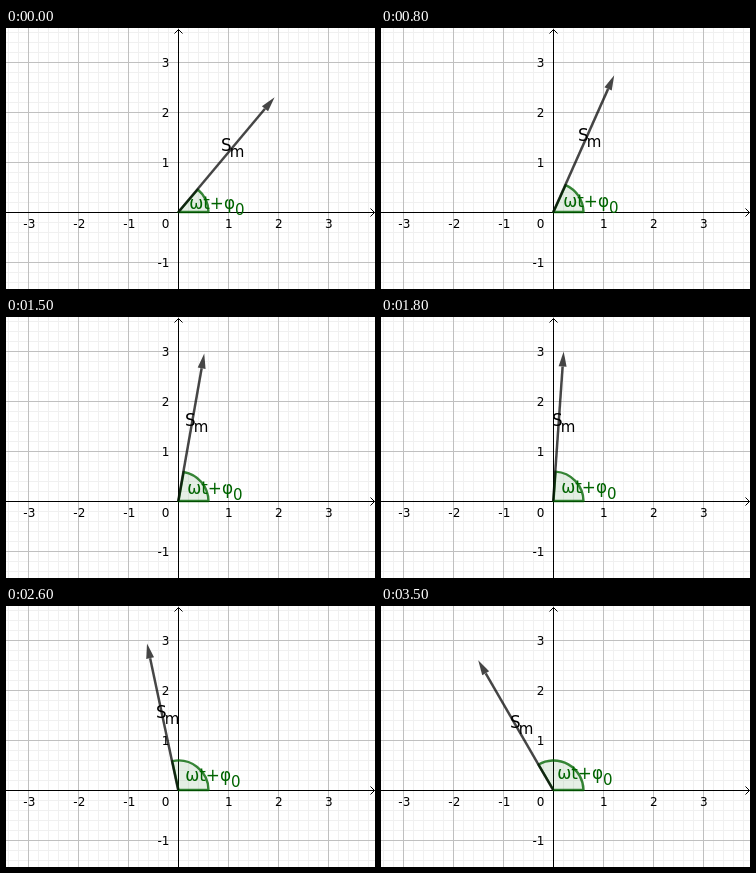
Write an HTML page that moves like this. It is 369x261 px and loops after 3600 ms.

```html
<!DOCTYPE html>
<html lang="en">
<head>
<meta charset="utf-8">
<title>Rotating vector</title>
<style>
  html, body { margin: 0; width: 100%; height: 100%; overflow: hidden; background: #fff; }
  svg { display: block; width: 369px; height: 261px; }
  text { font-family: "DejaVu Sans", sans-serif; }
  path { fill: none; }
  #minor { stroke: #f0f0f0; }
  #major { stroke: #c0c0c0; }
  #axes { stroke: #000; }
  #ticks { font-size: 12px; }
  #sector { fill: rgba(0, 100, 0, .1); stroke: rgba(0, 100, 0, .78); stroke-width: 2.4; stroke-linejoin: round; }
  #vector { opacity: .72; }
  #shaft { stroke: #000; stroke-width: 2.5; }
  #head { fill: #000; }
  .label { font-size: 16.8px; }
  .sub { font-size: 15px; }
  #phase { fill: #006400; }
</style>
</head>
<body>
<svg viewBox="0 0 369 261">
  <path id="minor"/>
  <path id="major"/>
  <path id="axes" d="M0 184.5H368.5M172.5 261V1.5M364.5 180.5l4 4l-4 4M168.5 5.5l4 -4l4 4"/>
  <g id="ticks"></g>
  <path id="sector"/>
  <g id="vector">
    <path id="shaft" d="M0 0H135"/>
    <path id="head" d="M150 0l-15 -4v8z"/>
  </g>
  <g id="phase" class="label">
    <text x="-.8">ωt+φ</text><text class="sub" x="45" y="6">0</text>
  </g>
  <g id="amplitude" class="label">
    <text x="-1">S</text><text class="sub" x="7.8" y="6">m</text>
  </g>
</svg>
<script>
  const W = 369, H = 261, UNIT = 50, OX = 172.5, OY = 184.5;
  const LENGTH = 3 * UNIT, RADIUS = 30, STEP_MS = 100, STEPS = 36;
  const get = id => document.getElementById(id);

  function gridPath(gap) {
    let d = '';
    for (let x = OX % gap; x < W; x += gap) d += `M${x} 0V${H}`;
    for (let y = OY % gap; y < H; y += gap) d += `M0 ${y}H${W}`;
    return d;
  }

  function addTick(value, x, y, anchor) {
    const text = document.createElementNS('http://www.w3.org/2000/svg', 'text');
    text.setAttribute('x', x);
    text.setAttribute('y', y);
    text.setAttribute('text-anchor', anchor);
    text.textContent = value;
    get('ticks').append(text);
  }

  function place(id, x, y) {
    get(id).setAttribute('transform', `translate(${x} ${y})`);
  }

  function draw(step) {
    const degrees = 50 + 2 * step;
    const angle = degrees * Math.PI / 180;
    const cos = Math.cos(angle), sin = Math.sin(angle);

    get('vector').setAttribute('transform', `translate(${OX - .3} ${OY - .3}) rotate(${-degrees})`);
    get('sector').setAttribute('d',
      `M${OX} ${OY - .5}h${RADIUS}A${RADIUS} ${RADIUS} 0 0 0 ${OX + RADIUS * cos} ${OY - RADIUS * sin}Z`);

    // The amplitude label sits beside the middle of the vector.
    place('amplitude',
      Math.round(172 + LENGTH / 2 * cos - 5.2 * sin),
      Math.round(184 - LENGTH / 2 * sin - 5.2 * cos));

    // The phase label follows the bisector of the angle.
    const reach = RADIUS / 1.7;
    place('phase',
      Math.floor(169 + reach * Math.cos(angle / 2)),
      Math.floor(189 - reach * Math.sin(angle / 2)));
  }

  get('minor').setAttribute('d', gridPath(UNIT / 5));
  get('major').setAttribute('d', gridPath(UNIT));
  for (let n = -3; n <= 3; n++) {
    if (n) addTick(n, OX + n * UNIT + (n < 0 ? .8 : .2), 200, 'middle');
    if (n && n > -2) addTick(n, 163.5, OY - n * UNIT + 4.5, 'end');
  }
  addTick(0, 163.5, 200, 'end');

  const start = performance.now();
  function tick() {
    const elapsed = Math.max(0, performance.now() - start);
    draw(Math.floor(elapsed / STEP_MS) % STEPS);
    requestAnimationFrame(tick);
  }
  tick();
</script>
</body>
</html>
```
